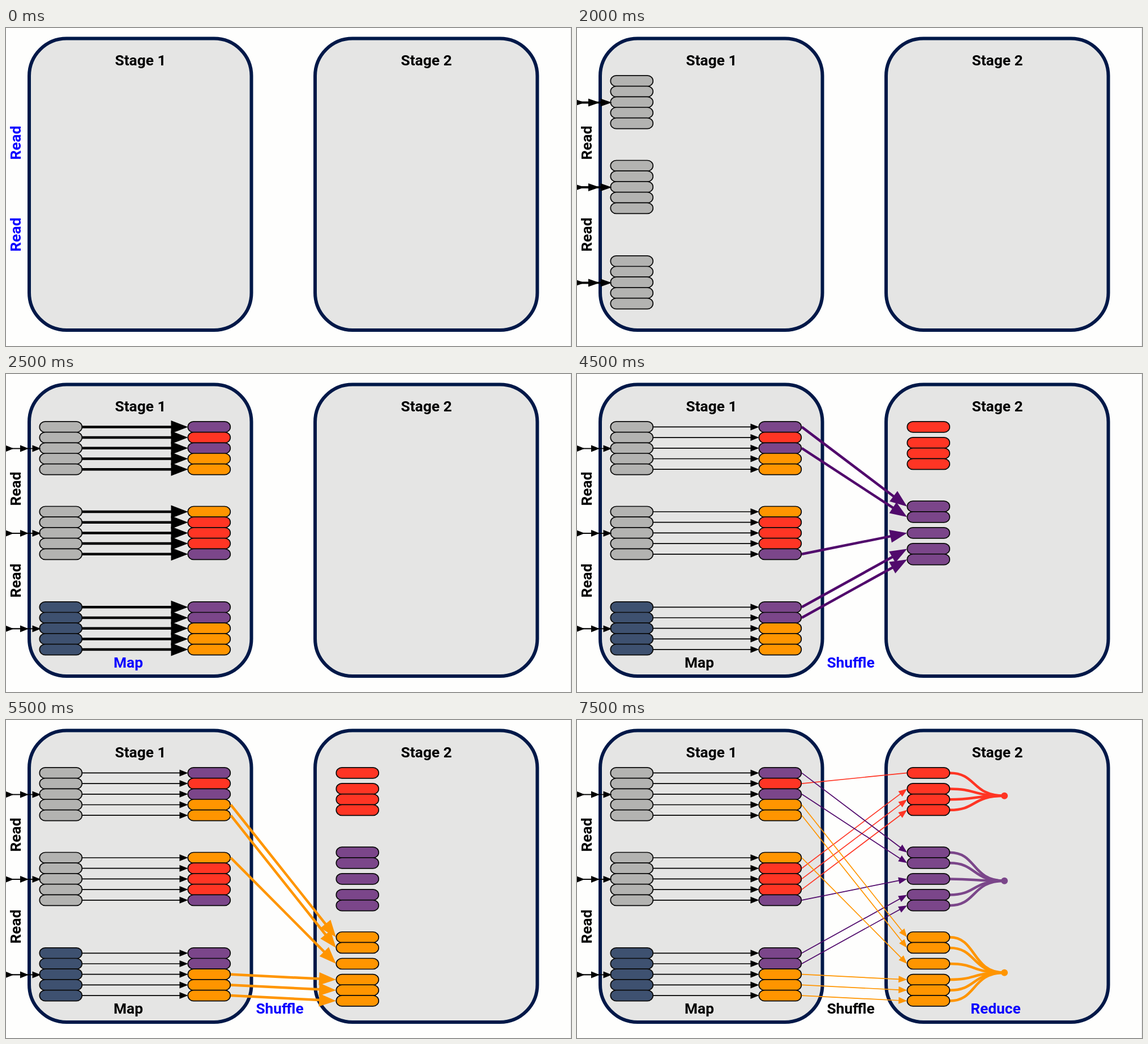
Recreate the animation shown at these times as an HTML page. Size 998 by 561 pixels, loop 8 s.

```html
<!DOCTYPE html>
<html lang="en">
<head>
<meta charset="utf-8">
<title>Map, shuffle, reduce</title>
<style>
html, body { margin: 0; width: 100%; height: 100%; overflow: hidden; background: #fefefd; }
svg { display: block; width: 100%; height: 100%; }
text { font: 600 26.3px Roboto, Inter, sans-serif; text-anchor: middle; }
</style>
</head>
<body>
<svg id="stage" viewBox="0 0 998 561"></svg>
<script>
const LOOP = 8000;
const svg = document.getElementById('stage');
const BLUE = '#0a00ff';
const FILL = { g: '#b3b3b1', n: '#3e5170', p: '#7b468a', r: '#ff3524', o: '#ff9500' };
const LINE = { ...FILL, p: '#510a6c', k: '#000' };
const THICK = { width: 4.5, head: 30, half: 11.5 };
const THIN = { width: 1.7, head: 15, half: 6 };
const READ = { width: 3.5, head: 20, half: 7 };

// Rows sit on a grid of half a box height.
const rowY = k => 93.4 + 9.35 * k;
const groups = [
  { row: 0, colors: 'prpoo' },
  { row: 16, colors: 'orrrp' },
  { row: 34, colors: 'ppooo' }
];
const reducers = [
  { color: 'r', rows: [0, 3, 5, 7], y: 133.7, start: 3500 },
  { color: 'p', rows: [15, 17, 20, 23, 25], y: 283.7, start: 4500 },
  { color: 'o', rows: [31, 33, 36, 39, 41, 43], y: 445.7, start: 5500 }
];
const sourceRows = color => groups.flatMap(({ row, colors }) =>
  [...colors].flatMap((c, i) => c === color ? [row + 2 * i] : []));

const panel = x => `<rect x="${x}" y="18.5" width="392.5" height="514.5" rx="66"
  fill="#e5e5e4" stroke="#001848" stroke-width="6"/>`;

const box = (x, row, color) => `<rect x="${x}" y="${rowY(row) - 9.5}" width="75" height="19" rx="10"
  fill="${FILL[color]}" stroke="#0a0a0a" stroke-width="1.7"/>`;

const label = (s, x, y, color = '#000', turn = 0) =>
  `<text fill="${color}" transform="translate(${x} ${y}) rotate(${turn})">${s}</text>`;

function arrow(x1, y1, x2, y2, color, { width, head, half }, hasHead = true) {
  const len = Math.hypot(x2 - x1, y2 - y1);
  const angle = Math.atan2(y2 - y1, x2 - x1) * 180 / Math.PI;
  const end = hasHead ? len - head + 1 : len;
  const tip = hasHead ? `<path d="M${len} 0l${-head} ${-half}v${2 * half}z"/>` : '';
  return `<g transform="translate(${x1} ${y1}) rotate(${angle})" fill="${color}">
    <path d="M0 0H${end}" stroke="${color}" stroke-width="${width}"/>${tip}</g>`;
}

function stageOne(t) {
  let out = '';
  const mapped = t >= 2500;
  groups.forEach(({ row, colors }, n) => {
    [...colors].forEach((color, i) => {
      const r = row + 2 * i, y = rowY(r);
      out += box(59.3, r, mapped && n === 2 ? 'n' : 'g');
      if (!mapped) return;
      out += box(321.3, r, color);
      out += arrow(134, y, 321.5, y, LINE.k, t < 3500 ? THICK : THIN);
    });
    const y = rowY(row + 4) + 0.7;
    for (const tip of [13.5, 40, 61.5])
      out += arrow(-20, y, tip, y, LINE.k, mapped ? THIN : READ);
  });
  return out;
}

function stageTwo(t) {
  let lines = '', boxes = '';
  for (const { color, rows, y, start } of reducers) {
    if (t < start) continue;
    const from = sourceRows(color);
    const active = t < start + 1000;
    rows.forEach((row, i) => {
      const end = rowY(row);
      boxes += box(583.3, row, color);
      if (active || t >= 6500)
        lines += arrow(397, rowY(from[i]), 583, end, LINE[color],
          active ? THICK : THIN, t < 7500 || row > 0);
      if (t >= 7500)
        lines += `<path d="M658.5 ${end}C706 ${end} 697 ${y} 755 ${y}"
          fill="none" stroke="${FILL[color]}" stroke-width="4.5"/>`;
    });
    if (t >= 7500) lines += `<circle cx="755" cy="${y}" r="6" fill="${FILL[color]}"/>`;
  }
  return lines + boxes;
}

function scene(t) {
  const tint = until => t < until ? BLUE : '#000';
  let out = '<path d="M997.5 0V561" stroke="#e6e6e8"/>' + panel(41) + panel(546);
  out += label('Stage 1', 237.5, 65.5) + label('Stage 2', 742.5, 65.5);
  for (const y of [202.5, 364.5]) out += label('Read', 25.5, y, tint(2000), -90);
  if (t >= 1500) out += stageOne(t) + stageTwo(t);
  if (t >= 2500) out += label('Map', 216, 517.5, tint(3500));
  if (t >= 3500) out += label('Shuffle', 483.5, 517.5, tint(7500));
  if (t >= 7500) out += label('Reduce', 739.5, 517.5, BLUE);
  return out;
}

const t0 = performance.now();
let shown = -1;
function tick(now) {
  // Every change falls on a half second.
  const step = Math.floor(Math.max(0, now - t0) % LOOP / 500);
  if (step !== shown) {
    svg.innerHTML = scene(step * 500);
    shown = step;
  }
  requestAnimationFrame(tick);
}
tick(t0);
</script>
</body>
</html>
```
